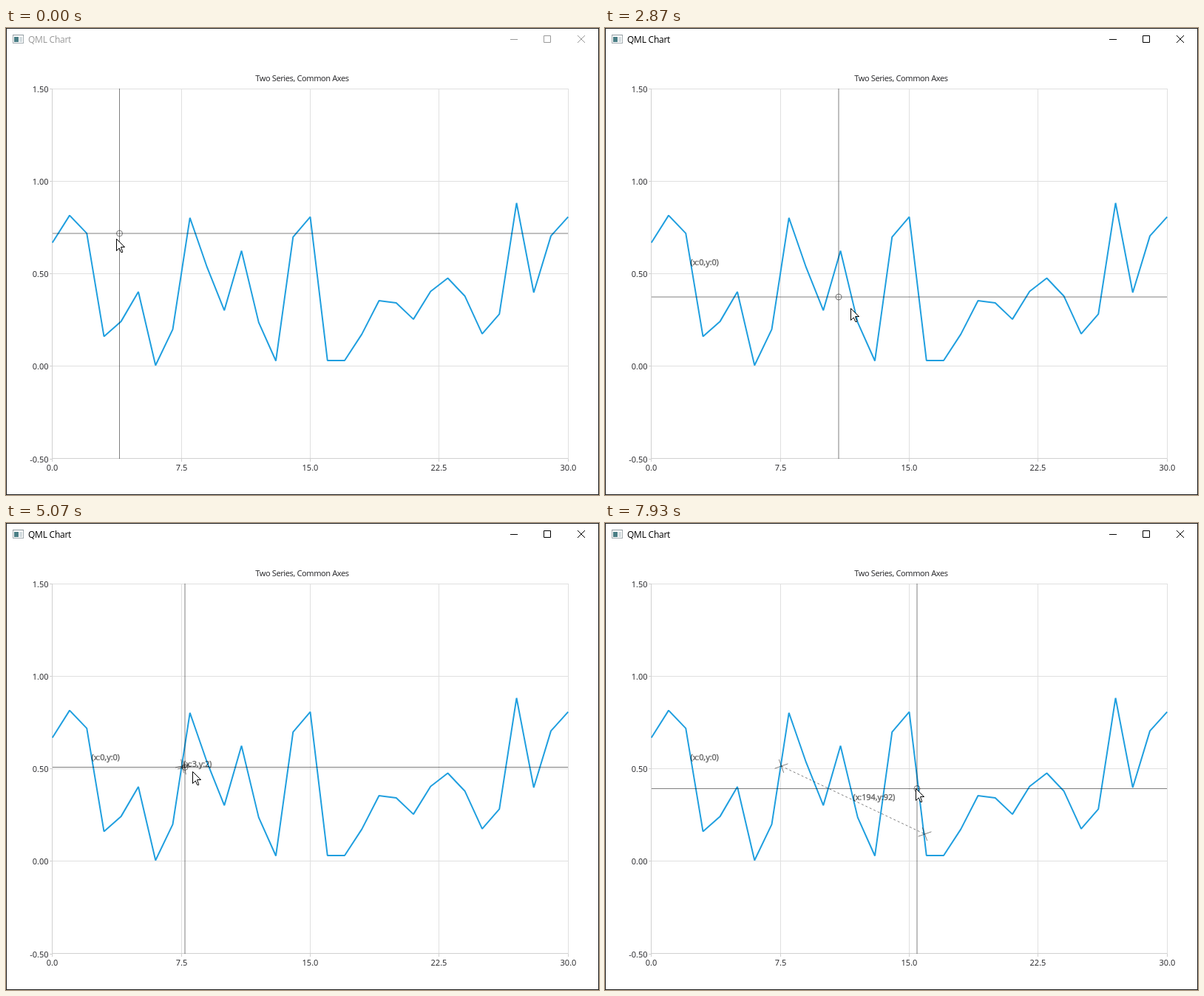
An HTML page that plays this animation: 802 px wide and 632 px high, repeating every 8000 ms.

```html
<!DOCTYPE html>
<html lang="en">
<head>
<meta charset="utf-8">
<title>QML Chart</title>
<style>
  html, body { margin: 0; width: 100%; height: 100%; overflow: hidden; background: #fff; }
  svg { display: block; width: 802px; height: 632px; }
  text { font: 11px "Noto Sans", "Open Sans", sans-serif; fill: #303033; }
  .caption { letter-spacing: -.4px; }
  .window { --ink: #999; }
  .window.active { --ink: #000; }
  .window text { font: 12px "Open Sans", "Noto Sans", sans-serif; letter-spacing: -.24px; fill: var(--ink); }
  .buttons { stroke: var(--ink); fill: none; }
  .grid { stroke: #e0e0e0; }
  .axis { stroke: #d0d0d0; }
  .series { stroke: #209fdf; stroke-width: 2; stroke-linejoin: bevel; fill: none; }
  .ink { stroke: #000; stroke-opacity: .5; fill: none; }
  .measure text { fill: #000; fill-opacity: .5; stroke: #000; stroke-opacity: .3; stroke-width: .7; letter-spacing: -.13px; }
  .dash { stroke-dasharray: 3 3; }
</style>
</head>
<body>
<svg viewBox="0 0 802 632">
  <rect width="802" height="632" fill="#fff"/>
  <g class="window" id="window">
    <rect x="9.5" y="9.5" width="14" height="11" fill="#fff" stroke="#a4adb2"/>
    <path d="M9 9.5H24" stroke="#8d989e"/>
    <rect x="11" y="12" width="6" height="7" fill="#4b7f86"/>
    <rect x="18" y="12" width="4" height="7" fill="#d5dde0"/>
    <text x="30" y="20">QML Chart</text>
    <path class="buttons" d="M682 15.5H692M727.5 10.5H736.5V19.5H727.5ZM773 10L783 20M783 10L773 20"/>
  </g>
  <path class="grid" id="grid"/>
  <path class="axis" id="axis"/>
  <g id="labels"></g>
  <text class="caption" x="400.5" y="72" text-anchor="middle">Two Series, Common Axes</text>
  <path class="series" id="series"/>
  <g class="measure" id="click"><text x="115.5" y="320.5">(x:0,y:0)</text></g>
  <g class="measure" id="drag">
    <path class="ink dash" id="span"/>
    <path class="ink" id="ends"/>
    <text id="size"></text>
  </g>
  <path class="ink" id="cross"/>
  <circle class="ink" id="ring" r="4"/>
  <path id="cursor" d="M.5 .5V16.5L4.2 12.9L6.8 18.5H8.6V17.3L6.6 11.9V11.5H11.5Z" fill="#fff" stroke="#000"/>
  <rect x=".5" y=".5" width="801" height="631" fill="none" stroke="#1c1c1c"/>
</svg>
<script>
const $ = id => document.getElementById(id);
const set = (id, name, value) => $(id).setAttribute(name, value);
const LOOP = 8000, TICK = 1000 / 15;
const LEFT = 63, TOP = 82, RIGHT = 760, BOTTOM = 583;
const toX = v => LEFT - .25 + v * 23.25;
const toY = v => 457.75 - v * 250.5;

// The plotted series, one value per unit of x
const series = [
  .668, .815, .718, .161, .243, .402, .005, .199, .802, .534, .302, .624, .237, .029, .698, .807,
  .031, .031, .173, .354, .342, .254, .404, .476, .378, .175, .282, .882, .398, .704, .807
];

function drawChart() {
  let grid = '', labels = '';
  let axis = `M${LEFT - .5} ${TOP}V${BOTTOM}M${LEFT} ${BOTTOM - .5}H${RIGHT}`;
  for (let i = 0; i < 5; i++) {
    const xv = i * 7.5, yv = 1.5 - i / 2;
    const x = Math.floor(toX(xv)) + .5, y = Math.floor(toY(yv)) + .5;
    if (i) grid += `M${x} ${TOP}V${BOTTOM}`;
    if (i < 4) grid += `M${LEFT} ${y}H${RIGHT + 1}`;
    axis += `M${x} ${BOTTOM}v4M${LEFT} ${y}h-4`;
    labels += `<text x="57.5" y="${y + 4.5}" text-anchor="end">${yv.toFixed(2)}</text>`
            + `<text x="${x}" y="599" text-anchor="middle">${xv.toFixed(1)}</text>`;
  }
  set('grid', 'd', grid);
  set('axis', 'd', axis);
  $('labels').innerHTML = labels;
  set('series', 'd', 'M' + series.map((v, i) => `${toX(i)} ${toY(v)}`).join('L'));
}

const linear = u => u;
const easeIn = u => u * u;
const easeOut = u => u * (2 - u);
const easeInOut = u => (1 - Math.cos(Math.PI * u)) / 2;

// Hand movements: first tick, last tick, x, y, easing; the pointer rests in between
const START = [152.5, 278];
const moves = [
  [0, 12, 120, 320, easeOut],
  [14, 29, 115, 320, easeOut],
  [35, 43, 315, 364, easeIn],
  [43, 48, 360, 404, easeOut],
  [48, 60, 229, 335, easeInOut],
  [60, 62, 230, 327, linear],
  [63, 66, 234, 327, linear],
  [68, 71, 238, 326, linear],
  [72, 74, 238, 329, linear],
  [75, 87, 425, 426, easeInOut],
  [87, 91, 430, 421, easeOut],
  [96, 99, 432, 421, linear],
  [102, 108, 676, 458, easeInOut],
  [108, 109, 656, 423, linear],
  [109, 120, 419, 359, easeOut]
];
const CLICK = 32, PRESS = 75, RELEASE = 100;

function pointer(tick) {
  let [x, y] = START;
  for (const [from, to, tx, ty, ease] of moves) {
    if (tick <= from) break;
    const u = ease(Math.min(1, (tick - from) / (to - from)));
    x += (tx - x) * u;
    y += (ty - y) * u;
  }
  return [x, y].map(v => Math.round(v * 2) / 2);
}

function drawMeasure(start, end) {
  const [ax, ay] = start.map(Math.round), [bx, by] = end.map(Math.round);
  const angle = Math.atan2(by - ay, bx - ax);
  const mark = (x, y) => [-1, 1].map(s => {
    const dx = 9.5 * Math.cos(angle + s * Math.PI / 4);
    const dy = 9.5 * Math.sin(angle + s * Math.PI / 4);
    return `M${x - dx} ${y - dy}L${x + dx} ${y + dy}`;
  }).join('');
  set('span', 'd', `M${ax + .5} ${ay}L${bx + .5} ${by}`);
  set('ends', 'd', mark(ax + .5, ay) + mark(bx + .5, by));
  set('size', 'x', (ax + bx) / 2 + .5);
  set('size', 'y', Math.floor((ay + by) / 2));
  $('size').textContent = `(x:${Math.abs(bx - ax)},y:${Math.abs(by - ay)})`;
}

function render(ms) {
  const tick = Math.floor((ms % LOOP + 4) / TICK) % 120;
  const [x, y] = pointer(tick);
  const [cx, cy] = pointer(tick + 1);   // the crosshair trails the cursor by one tick
  $('window').classList.toggle('active', tick >= CLICK);
  set('click', 'visibility', tick >= CLICK ? 'visible' : 'hidden');
  set('drag', 'visibility', tick > PRESS ? 'visible' : 'hidden');
  if (tick > PRESS) drawMeasure(pointer(PRESS), pointer(Math.min(tick, RELEASE)));
  set('cross', 'd', `M${x + 1} ${TOP}V${BOTTOM}M${LEFT} ${y}H${RIGHT}`);
  set('ring', 'cx', x + 1);
  set('ring', 'cy', y);
  set('cursor', 'transform', `translate(${Math.round(cx + 1)} ${Math.round(cy)})`);
}

drawChart();
const t0 = performance.now();
(function loop() {
  render(performance.now() - t0);
  requestAnimationFrame(loop);
})();
</script>
</body>
</html>
```
